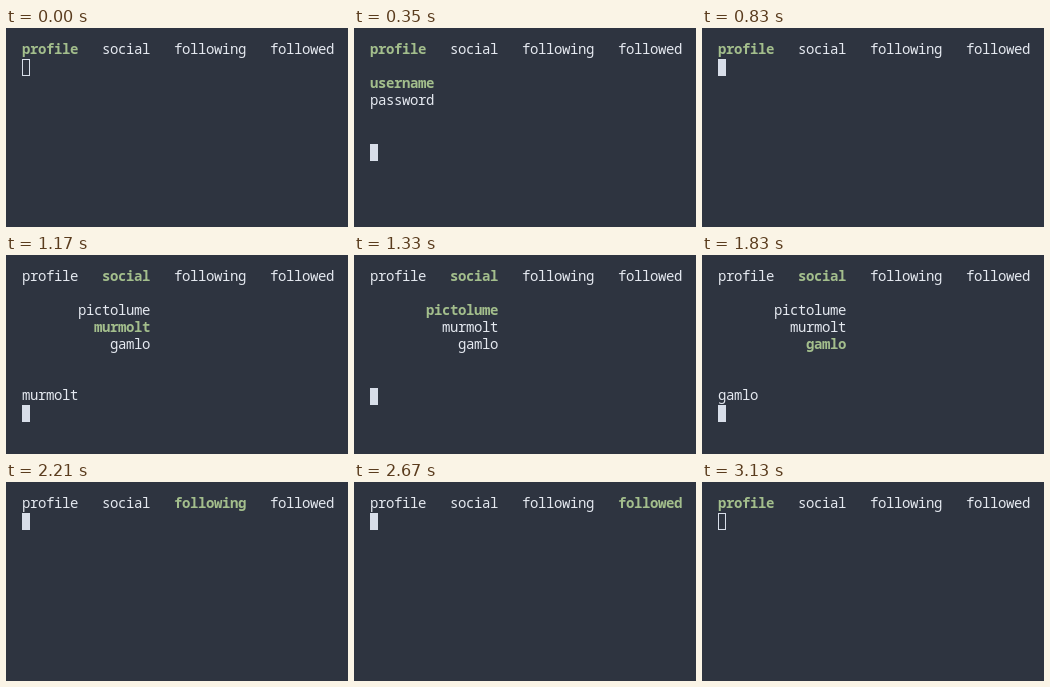
Recreate the animation shown at these times as an HTML page. Size 342 by 199 pixels, loop 3.16 s.

```html
<!DOCTYPE html>
<html>
<head>
<meta charset="utf-8">
<title>Terminal menu</title>
<style>
  html, body { margin: 0; width: 100%; height: 100%; overflow: hidden; background: #2e3440; }
  svg { display: block; }
  text {
    font: 500 14px "Noto Sans Mono", "DejaVu Sans Mono", monospace;
    letter-spacing: calc(8px - .6em);
    fill: #e5e9f0;
  }
  .on { font-weight: bold; fill: #a3be8c; }
  .solid { fill: #d8dee9; }
  .hollow { fill: none; stroke: #d8dee9; }
</style>
</head>
<body>
<svg id="screen" width="342" height="199" viewBox="0 0 342 199"></svg>
<script>
const LOOP = 3160, COL = 8, ROW = 17, LEFT = 16, TOP = 14;
const CLOSED = -1;

const tabs = [
  { name: 'profile', col: 0, items: ['username', 'password'] },
  { name: 'social', col: 10, items: ['pictolume', 'murmolt', 'gamlo'] },
  { name: 'following', col: 19, items: [] },
  { name: 'followed', col: 31, items: [] }
];

// start time, active tab, active item, choice printed
const steps = [
  [0, 0, CLOSED],
  [350, 0, 0],
  [600, 0, 1],
  [680, 0, 1, true],
  [830, 0, CLOSED],
  [960, 1, CLOSED],
  [1060, 1, 1],
  [1170, 1, 1, true],
  [1300, 1, CLOSED],
  [1330, 1, 0],
  [1460, 1, 0, true],
  [1570, 1, 0],
  [1670, 1, 1],
  [1700, 1, 2],
  [1830, 1, 2, true],
  [1860, 1, CLOSED],
  [1960, 2, CLOSED],
  [2060, 2, CLOSED, true],
  [2210, 2, CLOSED],
  [2340, 3, CLOSED],
  [2440, 3, CLOSED, true],
  [2670, 3, CLOSED],
  [2800, 0, CLOSED]
];

const word = (str, col, row, on) =>
  `<text x="${LEFT + col * COL}" y="${TOP + row * ROW + 12}" class="${on ? 'on' : ''}">${str}</text>`;

function cursor(row, hollow) {
  const y = TOP + row * ROW;
  return hollow
    ? `<rect class="hollow" x="${LEFT + .5}" y="${y + .5}" width="${COL - 1}" height="${ROW - 1}"/>`
    : `<rect class="solid" x="${LEFT}" y="${y}" width="${COL}" height="${ROW}"/>`;
}

function render(t) {
  const [, active, item, printed] = steps.findLast(s => s[0] <= t);
  const { name, col, items } = tabs[active];
  let out = tabs.map((tab, i) => word(tab.name, tab.col, 0, i === active)).join('');
  let row = 1;
  if (item !== CLOSED) {
    const end = col + name.length;
    items.forEach((label, i) => {
      out += word(label, Math.max(0, end - label.length), 2 + i, i === item);
    });
    row = items.length + 4;
  }
  if (printed) out += word(items[item] || name, 0, row++);
  return out + cursor(row, t < 150 || t >= 3130);
}

const screenEl = document.getElementById('screen');
const start = performance.now();
let last = '';

function tick() {
  const picture = render((performance.now() - start) % LOOP);
  if (picture !== last) screenEl.innerHTML = last = picture;
  requestAnimationFrame(tick);
}
tick();
</script>
</body>
</html>
```
